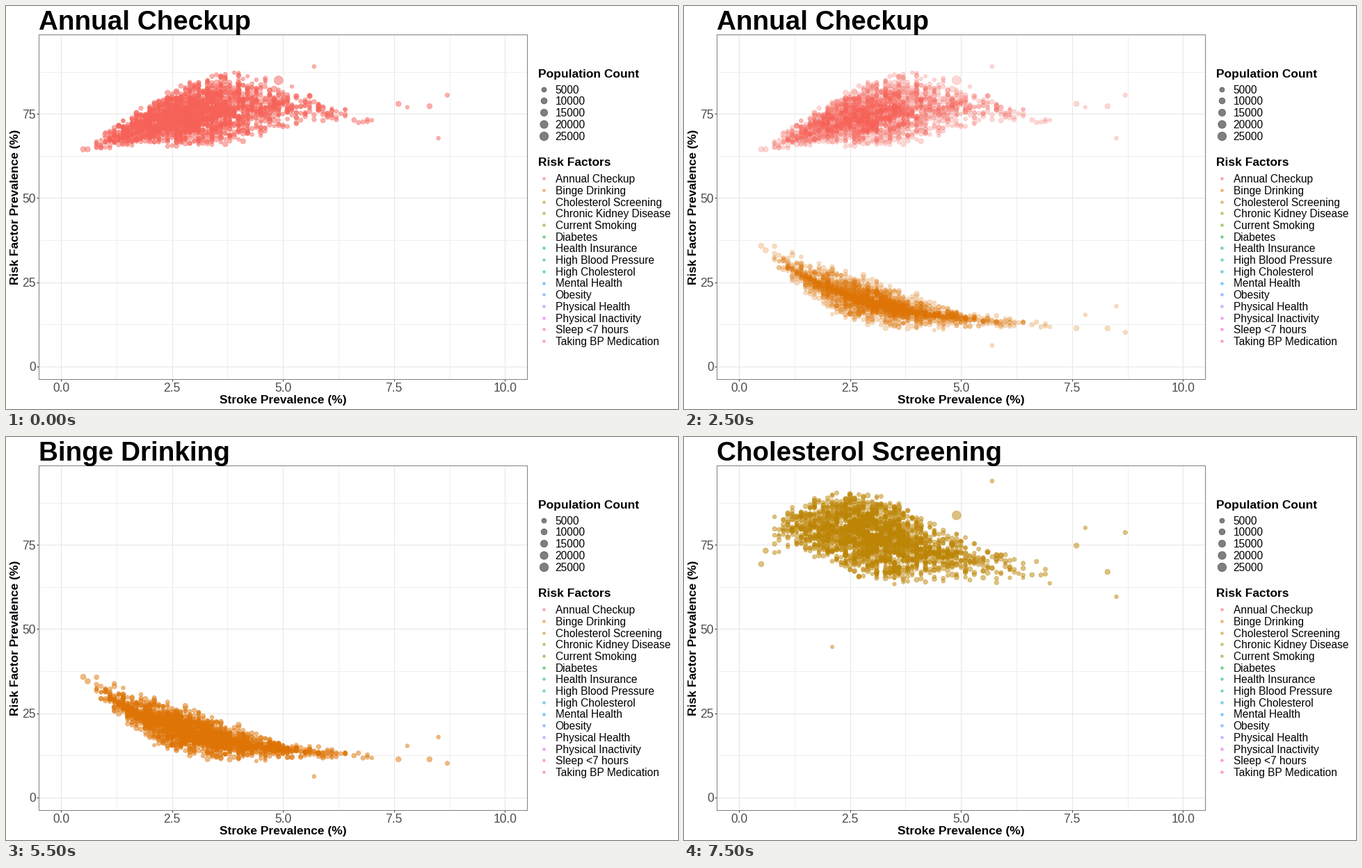
Animation, 966 px wide and 580 px high, one loop 8000 ms. Source, as a matplotlib script:

```python
import numpy as np
import matplotlib.pyplot as plt
from matplotlib.animation import FuncAnimation

plt.rcParams["font.family"] = "Liberation Sans"
W, H, DPI = 966, 580, 72  # at 72 dpi one point is one pixel
LEFT, RIGHT, TOP, BOTTOM = 47.2, 749.2, 41.2, 537.2
X0, DX, Y0, DY = 79.1, 63.82, 518.6, 4.843

FACTORS = ["Annual Checkup", "Binge Drinking", "Cholesterol Screening",
           "Chronic Kidney Disease", "Current Smoking", "Diabetes",
           "Health Insurance", "High Blood Pressure", "High Cholesterol",
           "Mental Health", "Obesity", "Physical Health",
           "Physical Inactivity", "Sleep <7 hours", "Taking BP Medication"]


def hue(degrees, chroma=100, lum=65):
    """Polar LUV colour as RGB, slightly darkened by the display gamma."""
    a = np.radians(degrees)
    u = chroma * np.cos(a) / (13 * lum) + 0.1978
    v = chroma * np.sin(a) / (13 * lum) + 0.4683
    y = ((lum + 16) / 116) ** 3
    xyz = np.array([9 * u, 4 * v, 12 - 3 * u - 20 * v]) * y / (4 * v)
    to_rgb = np.array([[3.2405, -1.5371, -0.4985],
                       [-0.9693, 1.8760, 0.0416],
                       [0.0556, -0.2040, 1.0572]])
    lin = np.clip(to_rgb @ xyz, 0.0032, 1)
    return tuple(np.clip(1.055 * lin ** (1 / 2.4) - 0.055, 0, 1) ** 1.25)


COLORS = [hue(15 + 24 * i) for i in range(len(FACTORS))]


def area(size):
    """Marker area in square pixels for a plot size in mm."""
    return (0.97 * 0.75 * (size * 2.845 + 1.89) - 0.8) ** 2


def pop_area(pop):
    return area(1 + 5 * np.sqrt(pop / 28000))


def bump(x, center, width):
    return np.exp(-((x - center) / width) ** 2)


# Ridge, half height and peakedness of each cloud
CLOUDS = [
    (lambda x: 77.3 - 0.78 * (x - 4.6) ** 2,
     lambda x: 1 + 10.3 * bump(x, 3.6, 2.1), 1.1),
    (lambda x: 11 + 31 * np.exp(-x / 2.2),
     lambda x: 2 + 6 * bump(x, 2.7, 1.9), 1.5),
    (lambda x: 64.5 + 16 * (x / 1.7) * np.exp(1 - x / 1.7),
     lambda x: 5 + 9 * bump(x, 3.1, 1.7), 1.1),
]

# Isolated points: x, population, value in each cloud
LONE = np.array([
    (0.5, 7000, 64.5, 35.8, 69.3), (0.6, 7000, 64.5, 34.5, 73.3),
    (2.1, 1500, 69, 15.5, 44.7), (4.9, 27000, 85, 14, 83.8),
    (5.7, 2500, 89.1, 6.2, 94), (7.6, 6500, 78, 11.3, 74.8),
    (7.8, 2000, 77, 15.3, 80.1), (8.3, 6500, 77.3, 11.3, 67),
    (8.5, 2300, 67.8, 17.9, 59.6), (8.7, 3500, 80.6, 10.1, 78.7)])

rng = np.random.default_rng(12)
x = np.concatenate([3.15 * np.exp(rng.normal(0, 0.29, 1800)),
                    rng.normal(1.6, 0.38, 230)])
x = np.round(x[(x > 0.76) & (x < 7.2)], 1)
pop = np.clip(3500 * np.exp(rng.normal(0, 0.42, x.size)), 600, 11000)


def cloud(ridge, half, power):
    t = 2 * rng.beta(2.4, 2.4, x.size) - 1
    return ridge(x) + half(x) * np.sign(t) * np.abs(t) ** power


fig = plt.figure(figsize=(W / DPI, H / DPI), dpi=DPI, facecolor="white")

ax = fig.add_axes([LEFT / W, 1 - BOTTOM / H,
                   (RIGHT - LEFT) / W, (BOTTOM - TOP) / H])
ax.set_xlim((LEFT - X0) / DX, (RIGHT - X0) / DX)
ax.set_ylim((Y0 - BOTTOM) / DY, (Y0 - TOP) / DY)
ax.set_xticks(np.arange(0, 11, 2.5))
ax.set_yticks(np.arange(0, 76, 25))
ax.set_xticks(np.arange(1.25, 10, 2.5), minor=True)
ax.set_yticks(np.arange(12.5, 90, 25), minor=True)
ax.grid(which="major", color="#e7e7e7", lw=1.1)
ax.grid(which="minor", color="#e9e9e9", lw=0.7)
ax.set_axisbelow(True)
ax.tick_params(which="major", length=3.3, width=1, color="#333333",
               labelbottom=False, labelleft=False)
ax.tick_params(which="minor", length=0)
for spine in ax.spines.values():
    spine.set(color="#7f7f7f", lw=1)

page = fig.add_axes([0, 0, 1, 1])
page.set(xlim=(0, W), ylim=(H, 0))
page.axis("off")


def label(px, py, text, size, **kw):
    kw = {"ha": "left", "va": "baseline", "color": "black", **kw}
    return page.text(px, py, text, fontsize=size, **kw)


def dots(axes, px, py, s, color):
    return axes.scatter(px, py, s=s, facecolor=color, edgecolor=color,
                        linewidth=0.7, alpha=0.5)


# Axis labels and headings
for v in ax.get_xticks():
    label(X0 + v * DX, 555, f"{v:.1f}", 17.5, ha="center", color="#4d4d4d")
for v in ax.get_yticks():
    label(42.5, Y0 - v * DY + 6.7, f"{v:.0f}", 17.5, ha="right",
          color="#4d4d4d")
label(398, 572, "Stroke Prevalence (%)", 17.4, ha="center", weight="bold")
label(18, 289.5, "Risk Factor Prevalence (%)", 17.4, ha="center",
      weight="bold", rotation=90, rotation_mode="anchor")
title = label(46.7, 34, "", 38.6, weight="bold")

# Legends
label(764.7, 103, "Population Count", 17.4, weight="bold")
for i in range(5):
    n, py = 5000 * (i + 1), 119.6 + 16.75 * i
    dots(page, [773.3], [py], pop_area(n), "black")
    label(789.7, py + 6, str(n), 15.56)
label(764.7, 230, "Risk Factors", 17.4, weight="bold")
for i, (name, color) in enumerate(zip(FACTORS, COLORS)):
    py = 248.2 + 16.7 * i
    dots(page, [773.3], [py], area(1.5), color)
    label(789.7, py + 6, name, 15.56)

xs = np.concatenate([x, LONE[:, 0]])
sizes = pop_area(np.concatenate([pop, LONE[:, 1]]))
layers = []
for k, spec in enumerate(CLOUDS):
    ys = np.concatenate([cloud(*spec), LONE[:, 2 + k]])
    layers.append(dots(ax, xs, ys, sizes, COLORS[k]))

FRAMES, STEP = 16, 500
FADES = (5, 12)  # steps where one cloud crosses into the next


def update(i):
    current = sum(i > f for f in FADES)
    fading = i in FADES
    for k, layer in enumerate(layers):
        layer.set_visible(k == current or (fading and k == current + 1))
        layer.set_alpha(0.25 if fading else 0.5)
    title.set_text(FACTORS[current])
    return [title, *layers]


anim = FuncAnimation(fig, update, frames=FRAMES, interval=STEP,
                     repeat=True, repeat_delay=0, blit=False)
plt.show()
```
